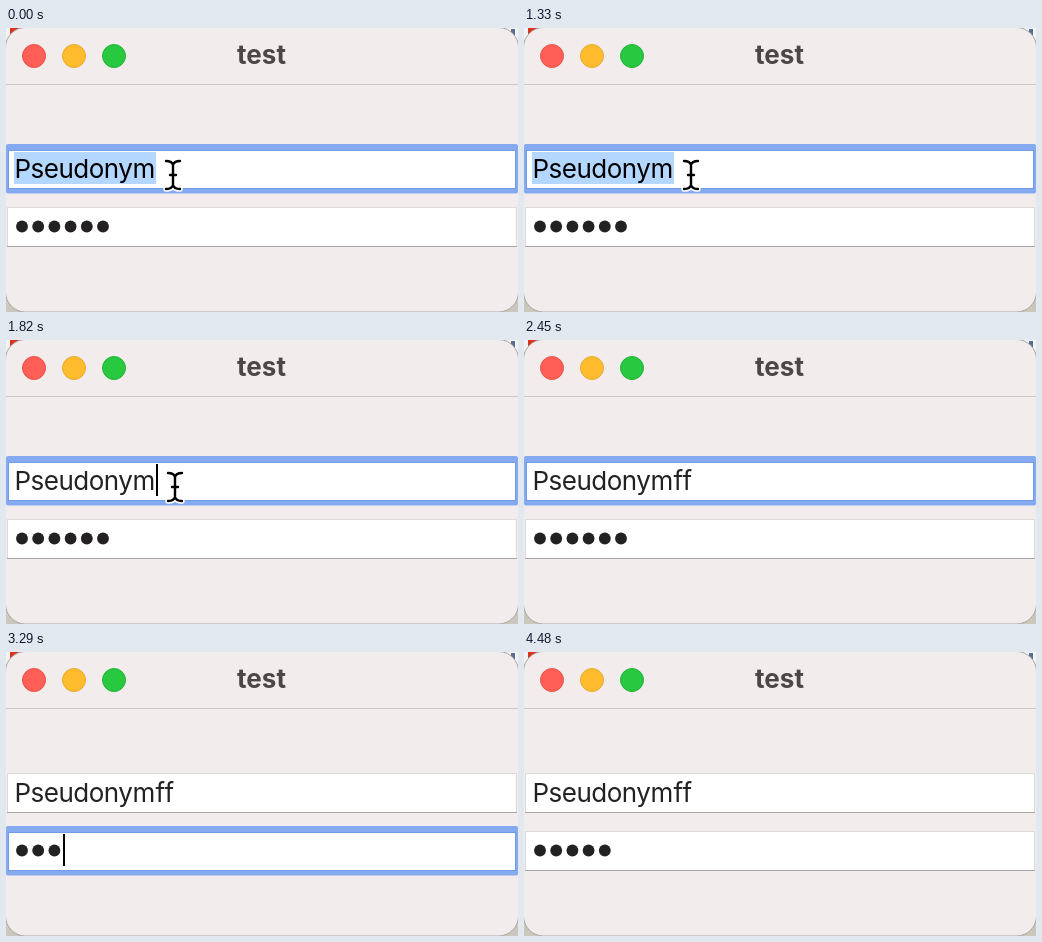
These frames come from a looping animation (512x284 px, 5110 ms). An HTML page:

```html
<!DOCTYPE html>
<html lang="en">
<head>
<meta charset="utf-8">
<title>test</title>
<style>
html, body { margin: 0; width: 100%; height: 100%; overflow: hidden; }
svg { display: block; width: 100vw; height: 100vh; }
text { font: 26px Inter, "Open Sans", sans-serif; letter-spacing: -.5px; white-space: pre; }
.title { font-weight: 700; letter-spacing: 0; text-anchor: middle; fill: #4b4746; }
.ink { fill: #232122; }

/* Every part shares one stepped 5.11 s timeline. */
.step { animation: 5110ms step-end infinite; }
.name-selection { animation-name: name-selection; }
.name-ink { animation-name: name-ink; }
.name-caret { animation-name: name-caret; }
.name-caret-x { animation-name: name-caret-x; }
.first-f { animation-name: first-f; }
.second-f { animation-name: second-f; }
.name-ring { animation-name: name-ring; }
.pointer { animation-name: pointer; }
.click { animation-name: click; }
.pass-ring { animation-name: pass-ring; }
.pass-selection { animation-name: pass-selection; }
.pass-ink { animation-name: pass-ink; }
.pass-end { animation-name: pass-end; }
.pass-caret { animation-name: pass-caret; }
.menu { animation-name: menu; }

@keyframes name-selection { 0% { opacity: 1 } 30.13%, 100% { opacity: 0 } }
@keyframes name-ink { 0% { fill: #000 } 30.13%, 100% { fill: #232122 } }
@keyframes name-caret {
  0% { opacity: 0 } 30.13% { opacity: 1 }
  46.57% { opacity: .4 } 47.94%, 100% { opacity: 0 }
}
@keyframes name-caret-x {
  0% { transform: none } 36.98% { transform: translateX(9px) }
  38.35%, 100% { transform: translateX(18px) }
}
@keyframes first-f { 0% { opacity: 0 } 36.98%, 100% { opacity: 1 } }
@keyframes second-f { 0% { opacity: 0 } 38.35%, 100% { opacity: 1 } }
@keyframes name-ring { 0% { opacity: 1 } 52.05%, 100% { opacity: 0 } }
@keyframes pointer {
  0% { transform: translate(167px, 147px) }
  27.39% { transform: translate(168px, 147px) }
  28.76% { transform: translate(169px, 147px) }
  36.98%, 100% { transform: translate(169px, 147px); opacity: 0 }
}
@keyframes click {
  0% { opacity: 0 } 30.13% { opacity: .85 }
  34.24% { opacity: .4 } 35.61%, 100% { opacity: 0 }
}
@keyframes pass-ring { 0% { opacity: 0 } 52.05% { opacity: 1 } 79.45%, 100% { opacity: 0 } }
@keyframes pass-selection { 0% { opacity: 0 } 52.05% { opacity: 1 } 61.64%, 100% { opacity: 0 } }
@keyframes pass-ink { 0% { fill: #232122 } 52.05% { fill: #000 } 61.64%, 100% { fill: #232122 } }
@keyframes pass-end {
  0% { transform: translateX(106px) }
  61.64% { transform: translateX(25px) }
  63% { transform: translateX(41px) }
  64.38% { transform: translateX(57px) }
  65.75% { transform: translateX(73px) }
  67.12%, 100% { transform: translateX(90px) }
}
@keyframes pass-caret { 0% { opacity: 0 } 61.64% { opacity: 1 } 78.08%, 100% { opacity: 0 } }
@keyframes menu {
  0% { opacity: 0 } 53.42% { opacity: 1 }
  61.64% { opacity: .6 } 63% { opacity: .25 } 64.38%, 100% { opacity: 0 }
}
</style>
</head>
<body>
<svg viewBox="0 0 512 284" preserveAspectRatio="none">
  <defs>
    <filter id="blur" x="-20%" y="-40%" width="140%" height="180%"><feGaussianBlur stdDeviation="11"/></filter>
    <g id="field">
      <rect x="1" width="510" height="40" fill="#dedada"/>
      <rect x="2" y="1" width="508" height="38" fill="#fff"/>
      <rect x="1" y="39" width="510" height="1" fill="#aaa5a5"/>
    </g>
    <g id="ring">
      <rect y="-5" width="512" height="49.5" rx="2" fill="#85aaf0"/>
      <rect x="2" y="1" width="508" height="39" fill="#719be4"/>
      <rect x="3" y="2" width="506" height="37" fill="#fff"/>
    </g>
    <path id="beam" d="M-7-14q6 0 7 4q1-4 7-4M0-10V10M-7 14q6 0 7-4q1 4 7 4M-3 0H3"
      fill="none" stroke-linecap="round" stroke-linejoin="round"/>
  </defs>

  <!-- desktop showing past the window corners -->
  <rect width="512" height="284" fill="#cbc7bc"/>
  <rect width="512" height="30" fill="#f4f2f1"/>
  <rect x="4" width="12" height="6" fill="#d9341c"/>
  <rect x="505" y="1" width="4" height="8" fill="#536f92"/>

  <rect x="-.5" y="-.5" width="513" height="284.5" rx="20" fill="#f2ecec" stroke="#aaa4a3"/>
  <rect y="56" width="512" height="1" fill="#cdc7c7"/>
  <g stroke-width="1">
    <circle cx="28" cy="28" r="11.5" fill="#ff5f57" stroke="#ea5148"/>
    <circle cx="68" cy="28" r="11.5" fill="#febc2e" stroke="#e8aa28"/>
    <circle cx="108" cy="28" r="11.5" fill="#28c840" stroke="#22b436"/>
  </g>
  <text class="title" x="255.5" y="36">test</text>

  <use href="#field" y="121"/>
  <use href="#ring" y="121" class="step name-ring"/>
  <rect class="step name-selection" x="8" y="124" width="142" height="32" fill="#b3d7ff"/>
  <text class="step name-ink" x="8.5" y="150">Pseudonym</text>
  <text class="ink step first-f" x="149.5" y="150">f</text>
  <text class="ink step second-f" x="158.6" y="150">f</text>
  <g class="step name-caret-x">
    <rect class="step name-caret" x="150" y="124" width="2" height="32" fill="#000"/>
  </g>

  <use href="#field" y="179"/>
  <use href="#ring" y="179" class="step pass-ring"/>
  <rect class="step pass-selection" x="8" y="182" width="98" height="32" fill="#b3d7ff"/>
  <g class="step pass-ink">
    <circle cx="16" cy="198.5" r="5.9"/>
    <circle cx="32.2" cy="198.5" r="5.9"/>
    <circle cx="48.4" cy="198.5" r="5.9"/>
    <circle cx="64.6" cy="198.5" r="5.9"/>
    <circle cx="80.8" cy="198.5" r="5.9"/>
    <circle cx="97" cy="198.5" r="5.9"/>
  </g>
  <g class="step pass-end">
    <rect y="184" width="100" height="29" fill="#fff"/>
    <rect class="step pass-caret" y="182" width="2" height="32" fill="#000"/>
  </g>

  <g class="step menu">
    <rect x="-30" y="240" width="264" height="90" rx="14" fill="#000" opacity=".16" filter="url(#blur)"/>
    <rect x="-30" y="229.5" width="254.5" height="90" rx="14" fill="#ebe5e5" stroke="#b3adad"/>
    <text x="14" y="276" fill="#403b3b">Passwords...</text>
  </g>

  <circle class="step click" cx="168.5" cy="146" r="49.5" fill="none" stroke="#76aefb" stroke-width="5.5"/>
  <g class="step pointer">
    <use href="#beam" stroke="#fff" stroke-width="5.5"/>
    <use href="#beam" stroke="#000" stroke-width="2.4"/>
  </g>
</svg>
</body>
</html>
```
